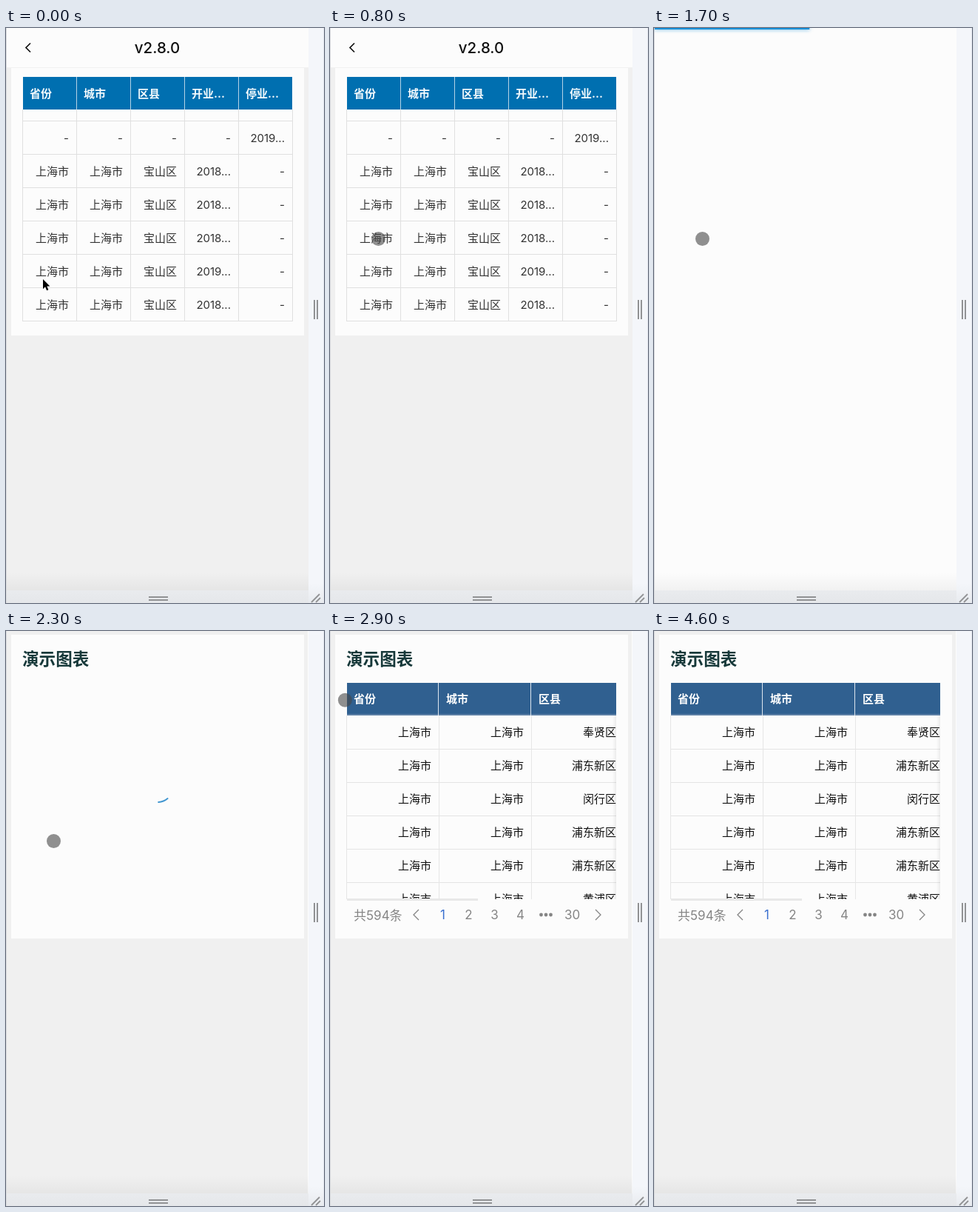
Animation, 430 px wide and 776 px high, one loop 4.7 s. Source, as an HTML page with a canvas:

```html
<!DOCTYPE html>
<html lang="zh-CN">
<head>
<meta charset="utf-8">
<style>
html, body { margin: 0; width: 100%; height: 100%; overflow: hidden; background: #fcfcfc; }
canvas { display: block; width: 430px; height: 776px; }
</style>
</head>
<body>
<canvas id="stage"></canvas>
<script>
const LOOP = 4700, W = 430, H = 776;
const canvas = document.getElementById('stage');
const ctx = canvas.getContext('2d');
const dpr = window.devicePixelRatio || 1;
canvas.width = W * dpr;
canvas.height = H * dpr;

// [time, x, y]
const POINTER = [
  [0, 50, 339], [100, 51, 336], [300, 57, 312], [500, 64, 287], [600, 65.5, 284.5],
  [1900, 65.5, 284.5], [2100, 64.5, 283.5], [2500, 64.5, 283.5], [2600, 60, 260],
  [2700, 49, 200], [2800, 33, 138], [2900, 20.5, 93.5], [3000, 4, 60], [3100, -20, 40]
];
// [time, width]
const PROGRESS = [[1150, 18], [1200, 30], [1300, 70], [1500, 140], [1700, 210], [1800, 240], [1900, 330], [2000, 409]];

function sample(steps, t) {
  if (t <= steps[0][0]) return steps[0].slice(1);
  for (let i = 1; i < steps.length; i++) {
    const a = steps[i - 1], b = steps[i];
    if (t <= b[0]) {
      const k = (t - a[0]) / (b[0] - a[0]);
      return a.slice(1).map((v, j) => v + (b[j + 1] - v) * k);
    }
  }
  return steps[steps.length - 1].slice(1);
}

// cubic-bezier(.42, 0, .58, 1)
function easeInOut(x) {
  let lo = 0, hi = 1, u = 0.5;
  for (let i = 0; i < 20; i++) {
    u = (lo + hi) / 2;
    const bx = 1.26 * u * (1 - u) ** 2 + 1.74 * u * u * (1 - u) + u ** 3;
    if (bx < x) lo = u; else hi = u;
  }
  return u * u * (3 - 2 * u);
}

function rect(x, y, w, h, color) {
  ctx.fillStyle = color;
  ctx.fillRect(x, y, w, h);
}

function line(points, color, width) {
  ctx.beginPath();
  points.forEach(([x, y]) => ctx.lineTo(x, y));
  ctx.strokeStyle = color;
  ctx.lineWidth = width;
  ctx.stroke();
}

function text(s, x, cy, size, color, align = 'left', weight = 400) {
  ctx.font = `${weight} ${size}px Inter, "Noto Sans CJK SC", "Noto Sans CJK", sans-serif`;
  ctx.textAlign = align;
  ctx.fillStyle = color;
  ctx.fillText(s, x, cy + size * 0.37);
}

function shade(x0, y0, x1, y1, from, to) {
  const g = ctx.createLinearGradient(x0, y0, x1, y1);
  g.addColorStop(0, from);
  g.addColorStop(1, to);
  return g;
}

function listPage(pressed) {
  rect(0, 0, 409, H, '#f0f0f0');
  rect(0, 0, 409, 53, '#fcfcfc');
  rect(0, 53, 409, 1, '#f1f1f1');
  rect(7, 54, 396, 361, '#fcfcfc');
  line([[33, 20.5], [27, 26.5], [33, 32.5]], '#111', 1.7);
  text('v2.8.0', 204.5, 26.5, 20.5, '#111', 'center', 500);

  if (pressed) rect(23, 261, 72, 44, '#e4edf9');
  rect(23, 66, 364, 44, '#006fb0');
  ['省份', '城市', '区县', '开业...', '停业...'].forEach((s, i) => {
    text(s, 32 + i * 73, 88, 15, '#f4fafd', 'left', 700);
  });
  for (let i = 0; i < 7; i++) rect(22, 125 + i * 45, 366, 1, '#e0e0e0');
  for (let i = 0; i < 6; i++) {
    const x = i ? 22 + i * 73 : 22;
    rect(x, 110, 1, 286, '#e0e0e0');
    if (i && i < 5) rect(x, 66, 1, 44, '#b4d3e6');
  }
  const place = ['上海市', '上海市', '宝山区'];
  for (let r = 0; r < 6; r++) {
    const cells = r ? [...place, r === 4 ? '2019...' : '2018...', '-'] : ['-', '-', '-', '-', '2019...'];
    cells.forEach((s, i) => text(s, 85 + i * 73, 148 + r * 45, 15, '#333', 'right'));
  }
}

function chartCard(titled) {
  rect(0, 0, 408, H, '#f0f0f0');
  rect(7, 5, 396, 410, '#fcfcfc');
  if (titled) text('演示图表', 22, 37.5, 22.6, '#17393a', 'left', 700);
}

function spinner(s) {
  const k = s % 1.5 / 0.75;
  const p = easeInOut(Math.min(k, 1)), q = easeInOut(Math.max(k - 1, 0));
  const start = s * Math.PI + (40 * p + 80 * q) / 20;
  const end = Math.min(start + (1 + 89 * p) / 20, s * Math.PI + Math.PI * 2);
  ctx.beginPath();
  ctx.arc(205, 210, 21, start, end);
  ctx.strokeStyle = '#4196d0';
  ctx.lineWidth = 2;
  ctx.lineCap = 'round';
  ctx.stroke();
  ctx.lineCap = 'butt';
}

function chartTable() {
  ctx.save();
  ctx.beginPath();
  ctx.rect(22, 69, 365, 293);
  ctx.clip();
  rect(23, 70, 364, 44, '#306090');
  rect(23, 112, 364, 2, '#5c7fa5');
  ['省份', '城市', '区县'].forEach((s, i) => text(s, 32 + i * 125, 91.5, 15, '#fff', 'left', 700));
  ['奉贤区', '浦东新区', '闵行区', '浦东新区', '浦东新区', '黄浦区'].forEach((area, r) => {
    ['上海市', '上海市', area].forEach((s, i) => text(s, 137 + i * 125, 136.5 + r * 45, 15, '#111', 'right'));
    rect(22, 159 + r * 45, 365, 1, '#e4e4e4');
  });
  [22, 147, 272].forEach(x => rect(x, 114, 1, 248, '#e6e6e6'));
  [146, 271].forEach(x => rect(x, 70, 1, 44, '#dce5ee'));
  rect(382, 114, 5, 248, shade(382, 0, 387, 0, 'rgba(0,0,0,0)', 'rgba(0,0,0,.07)'));
  ctx.restore();
  rect(23, 361, 177, 3, '#e8e8e8');

  const gray = '#858585';
  text('共594条', 32, 383.5, 17, gray);
  ['1', '2', '3', '4', '', '30'].forEach((s, i) => {
    text(s, 152.5 + i * 35, 383, 17, i ? gray : '#3a70cf', 'center');
  });
  ctx.fillStyle = gray;
  for (let i = -1; i < 2; i++) {
    ctx.beginPath();
    ctx.arc(292 + i * 6.5, 383, 2.4, 0, Math.PI * 2);
    ctx.fill();
  }
  line([[120, 376], [113, 383], [120, 390]], gray, 1.3);
  line([[359, 376], [366, 383], [359, 390]], gray, 1.3);
}

function progressBar(t) {
  const [w] = sample(PROGRESS, t);
  ctx.save();
  ctx.globalAlpha = t > 2000 ? (2100 - t) / 100 : 1;
  ctx.shadowColor = '#1990d8';
  ctx.shadowBlur = 5 * dpr;
  rect(1, 0, w - 1, 2, '#188fd8');
  ctx.restore();
}

function resizeFrame() {
  rect(0, 735, 409, 24, shade(0, 735, 0, 759, 'rgba(0,0,0,0)', 'rgba(0,0,0,.045)'));
  rect(409, 0, 21, H, '#f4f6fa');
  rect(0, 759, W, 17, shade(0, 759, 0, 776, '#e9ebee', '#e5e7ea'));
  rect(409, 750, 21, 26, shade(0, 750, 0, 776, '#f4f6fa', '#e8ebef'));
  rect(0, 0, 1, H, '#d9dbde');
  rect(429, 0, 1, H, '#e5e8f0');
  const gray = '#919294';
  [416, 420].forEach(x => rect(x, 367, 2, 26, gray));
  [767, 771].forEach(y => rect(193, y, 26, 2, gray));
  line([[413, 775], [424, 764]], gray, 1.8);
  line([[419, 775], [425, 769]], gray, 1.8);
}

function pointer(t) {
  const [x, y] = sample(POINTER, t);
  if (t < 100) {
    const shape = new Path2D('M0 0V13.2L3 10.4 5.1 15.2 7.4 14.2 5.3 9.5H9.4Z');
    ctx.save();
    ctx.translate(x, y);
    ctx.strokeStyle = '#fff';
    ctx.lineWidth = 2;
    ctx.stroke(shape);
    ctx.fillStyle = '#000';
    ctx.fill(shape);
    ctx.restore();
    return;
  }
  ctx.beginPath();
  ctx.arc(x, y, 9.5, 0, Math.PI * 2);
  ctx.fillStyle = 'rgba(70,70,70,.6)';
  ctx.fill();
}

function draw(t) {
  ctx.setTransform(dpr, 0, 0, dpr, 0, 0);
  rect(0, 0, W, H, '#fcfcfc');
  if (t < 1400) listPage(t >= 1100);
  else if (t >= 1900) chartCard(t >= 2000);
  if (t >= 2110 && t < 2500) spinner((t - 2110) / 1000);
  if (t >= 2500) chartTable();
  resizeFrame();
  if (t >= 1150 && t < 2100) progressBar(t);
  if (t < 3100) pointer(t);
}

const begin = performance.now();
function tick() {
  draw((performance.now() - begin) % LOOP);
  requestAnimationFrame(tick);
}
tick();
</script>
</body>
</html>
```
